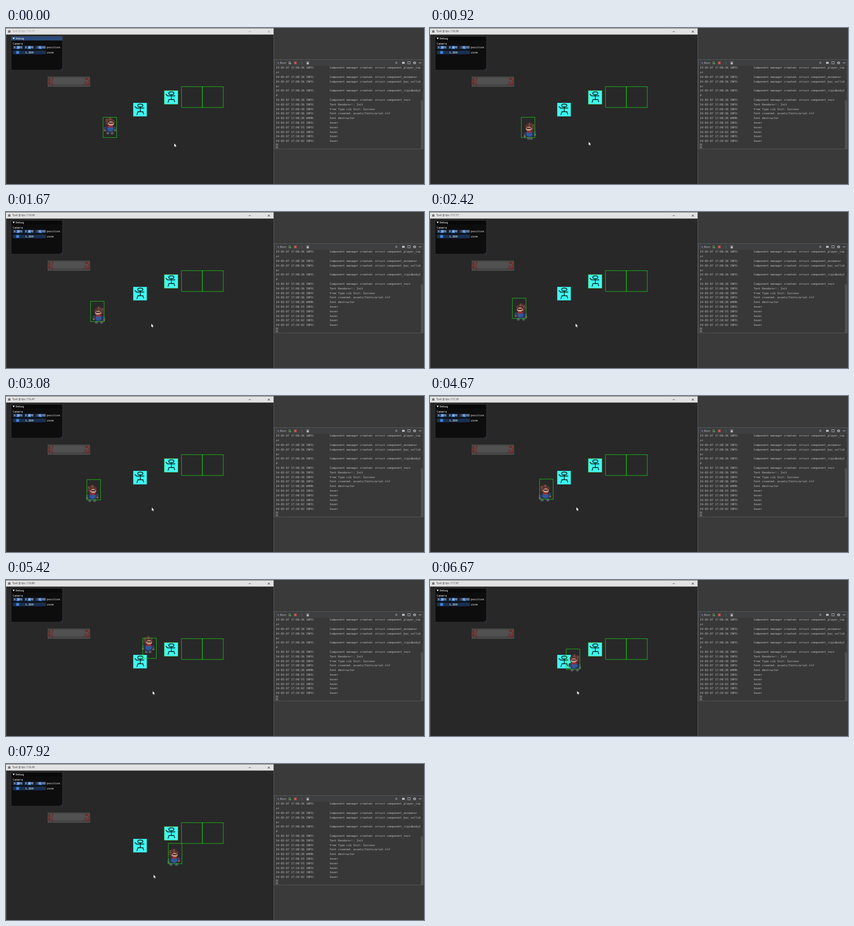
These frames come from a looping animation (800x300 px, 8 s). An HTML page with a canvas:

```html
<!DOCTYPE html>
<html lang="en">
<head>
<meta charset="utf-8">
<title>Game debug session</title>
<style>
  html, body { margin: 0; width: 100%; height: 100%; overflow: hidden; background: #3a3a3a; }
  canvas { display: block; width: 800px; height: 300px; }
</style>
</head>
<body>
<canvas id="stage" width="800" height="300"></canvas>
<script>
const ctx = document.getElementById('stage').getContext('2d');
const LOOP = 8000, STEPS = 96, STEP = LOOP / STEPS, FOCUS_TIME = 330;
const MONO = '"DejaVu Sans Mono", monospace', SANS = '"Open Sans", sans-serif';
const GREEN = '#1cc01c', INK = '#071b1b', ICON = '#b5b7b9';

// Waypoints: time, x, y
const playerRoute = [
  [0, 186, 172], [FOCUS_TIME, 186, 172], [1667, 162, 172], [3083, 155, 161],
  [4000, 172, 162], [4850, 220, 160], [5200, 250, 97], [5500, 267, 118],
  [5950, 300, 134], [6667, 261, 133], [7150, 300, 136], [7550, 303, 166], [LOOP, 313, 150]
];
const pointerRoute = [[0, 322, 222], [500, 322, 222], [1500, 278, 215], [LOOP, 282.5, 213]];

const log = (time, level, message) => `24-03-07 ${time} ${level}:`.padEnd(32) + message;
const info = message => log('17:08:36', 'INFO', message);
const component = name => info('Component manager created: struct component_' + name);
const consoleLines = [
  component('player_inp'), 'ut', component('animator'), component('box_collid'), 'er',
  component('rigidbody2'), 'd', component('text'),
  info('Text Renderer:: Init'), info('Free Type Lib Init: Success'),
  info('Font created: assets/fonts/arial.ttf'), log('17:08:36', 'WARN', 'Font destructor'),
  ...['08:55', '08:55', '10:02', '10:02', '10:02'].map(t => log('17:' + t, 'INFO', 'hover'))
];

const noise = n => { const v = Math.sin(n * 127.1 + 3.7) * 43758.5453; return v - Math.floor(v); };

function follow(route, t) {
  const next = route.findIndex(([time]) => time > t);
  const [t0, x0, y0] = route[next - 1], [t1, x1, y1] = route[next];
  const vx = (x1 - x0) / (t1 - t0), vy = (y1 - y0) / (t1 - t0);
  return { x: x0 + vx * (t - t0), y: y0 + vy * (t - t0), vx, vy };
}

function fill(color, x, y, w, h) {
  ctx.fillStyle = color;
  ctx.fillRect(x, y, w, h);
}

function outline(color, x, y, w, h, width = 1) {
  ctx.strokeStyle = color;
  ctx.lineWidth = width;
  ctx.strokeRect(x, y, w, h);
}

function line(color, width, ...points) {
  ctx.beginPath();
  points.forEach(([x, y]) => ctx.lineTo(x, y));
  ctx.strokeStyle = color;
  ctx.lineWidth = width;
  ctx.stroke();
}

function polygon(color, ...points) {
  ctx.beginPath();
  points.forEach(([x, y]) => ctx.lineTo(x, y));
  ctx.fillStyle = color;
  ctx.fill();
}

function oval(x, y, rx, ry) {
  ctx.beginPath();
  ctx.ellipse(x, y, rx, ry, 0, 0, Math.PI * 2);
}

function blob(color, x, y, rx, ry) {
  oval(x, y, rx, ry);
  ctx.fillStyle = color;
  ctx.fill();
}

function ring(color, width, x, y, rx, ry) {
  oval(x, y, rx, ry);
  ctx.strokeStyle = color;
  ctx.lineWidth = width;
  ctx.stroke();
}

function cross(color, x, y) {
  line(color, .8, [x - 2, y - 2], [x + 2, y + 2]);
  line(color, .8, [x + 2, y - 2], [x - 2, y + 2]);
}

function label(text, x, y, color, size = 5.35, family = MONO, align = 'left') {
  ctx.font = `${size}px ${family}`;
  ctx.textAlign = align;
  ctx.textBaseline = 'middle';
  ctx.fillStyle = color;
  ctx.fillText(text, x, y);
}

function drawWindow(step, focused) {
  fill('#282828', 0, 0, 513, 300);
  fill('#e2e2e2', 0, .6, 513, 12);
  line('#555', 1, [512.5, 0], [512.5, 300]);
  line('#555', 1, [.5, 13], [.5, 300]);
  fill('#777', 4, 4.5, 4.5, 4.5);
  const ink = focused ? '#333' : '#999';
  const rate = 116.3 + noise(step) * 2.8;
  label(`Tovil @ fps: ${rate.toFixed(2)}`, 12, 7, ink, 5, SANS);
  line(ink, .8, [464.5, 7], [468.5, 7]);
  cross(ink, 503, 7);
}

function slider(x, y, w, value, grab) {
  fill('#1b3050', x, y, w, 7);
  fill('#3b82dc', x + grab, y + .7, 5.5, 5.6);
  label(value, x + w / 2, y + 3.7, '#eee', 5.35, MONO, 'center');
}

function drawDebugPanel(focused) {
  fill('#0d0d0d', 10, 16, 98, 65);
  fill(focused ? '#090909' : '#294a7a', 10, 16, 98, 8);
  outline('#3c3c43', 10, 16, 98, 65, .6);
  polygon('#eee', [12.5, 18.5], [17, 18.5], [14.75, 22]);
  label('Debug', 18.5, 20.3, '#f2f2f2');
  label('Camera', 13, 30.3, '#eee');
  ['0.500', '0.000', '-10.00'].forEach((value, i) => slider(13 + i * 21.5, 34, 20, value, 7.3));
  slider(13, 43.5, 63.5, '1.000', 6.5);
  label('position', 78, 37.8, '#eee');
  label('zoom', 78, 47.2, '#eee');
  polygon('#1d2c40', [108, 76], [108, 81], [103, 81]);
}

function drawBanner() {
  fill('#3c3c3c', 80, 94, 81, 19);
  fill('#525252', 82, 95.5, 77, 15);
  fill('#494949', 84, 107, 73, 3.5);
  outline('#6a6a6a', 80.5, 94, 79.5, 18.5, .6);
  for (let i = 0; i < 60; i++) {
    const depth = noise(i) ** 2 * 10, y = 95 + noise(i + 80) * 15;
    fill(i % 3 ? '#6c2424' : '#8c2a2a', i % 2 ? 81 + depth : 158 - depth, y, 1.8, 1.8);
  }
}

function drawStickBlock(x, y) {
  ctx.save();
  ctx.translate(x, y);
  fill('#3ffaf0', 0, 0, 26, 26);
  ring(INK, 1.5, 13.5, 5, 5, 2.8);
  line(INK, 1.4, [13.5, 8], [13.5, 17]);
  line(INK, 1.4, [3, 6.5], [6, 10], [21, 10]);
  line(INK, 1.4, [7, 23], [9, 17], [18.5, 17], [20, 22]);
  ctx.restore();
}

function drawHero(swing) {
  for (const side of [-1, 1]) {
    blob('#55565e', 13 + side * (4 + swing), 30, 3, 3);
    blob('#3a4356', 13 + side * 9, 22 - side * swing, 3, 4.5);
    blob('#8a6156', 13 + side * 10, 25 - side * swing, 2, 1.8);
  }
  blob('#263656', 13, 22, 8.5, 7);
  blob('#30589a', 14, 22, 6, 5);
  blob('#4a2d2c', 12.5, 9, 10, 9);
  for (let i = 0; i < 16; i++) {
    const angle = i * 2.4, r = Math.sqrt(noise(i)) * 7.5;
    fill(i % 2 ? '#70463e' : '#8a5949', 11.5 + Math.cos(angle) * r, 7 + Math.sin(angle) * r, 2.5, 2);
  }
  blob('#c59380', 15, 12, 5.5, 4);
  fill('#35262b', 11, 10, 8, 2);
  blob('#952d38', 14, 17.5, 5.5, 2);
}

function drawPlayer(t, step) {
  const { x, y, vx, vy } = follow(playerRoute, t);
  const moving = vx !== 0;
  const lagX = -3 * Math.sign(vx), lagY = moving ? 10 - Math.max(0, vy) * 200 : 0;
  ctx.save();
  ctx.translate(Math.round(x + 13 + lagX), Math.round(y + lagY));
  if (vx < 0) ctx.scale(-1, 1);
  ctx.translate(-13, 0);
  drawHero(moving ? Math.sin(step * 1.6) * 1.5 : 0);
  ctx.restore();
  outline(GREEN, Math.round(x) - .2, Math.round(y) - .2, 26, 39, .9);
}

function drawScene() {
  drawBanner();
  drawStickBlock(243.5, 144);
  drawStickBlock(303, 120.5);
  outline('#62d83c', 303, 120.5, 26, 26, .6);
  for (const x of [336, 376]) outline(GREEN, x - .2, 112.8, 40, 40, .9);
}

function drawConsoleHeader(focused) {
  fill('#3d3f41', 514, 61, 284, 12);
  line('#b0708c', .9, [518, 65], [522.5, 69]);
  line('#5b91bd', .9, [520.5, 69], [522.5, 66]);
  label('Run:', 524.5, 67, '#c5c5c5', 5.8, SANS);
  const rerun = focused ? '#5ca65c' : '#aaa';
  line(rerun, .9, [545, 65], [541.5, 65], [541.5, 69], [544, 69]);
  polygon(rerun, [543, 66.5], [546.5, 68.2], [543, 70]);
  fill('#cc5350', 551.5, 64.7, 4.6, 4.8);
  line('#555', .6, [561, 63], [561, 71]);
  line('#666', .8, [566.5, 64.5], [566.5, 69.5]);
  fill(ICON, 575.5, 66, 4, 4);
  fill(ICON, 575, 64.5, 5, .8);
  cross(ICON, 747, 67);
  fill(ICON, 758, 65, 5, 4);
  outline(ICON, 769, 64.5, 4.5, 4.5, .8);
  ring(ICON, 1.4, 782, 67, 1.8, 1.8);
  line(ICON, .9, [790, 67], [795, 67]);
}

function drawConsole(focused) {
  fill('#3a3a3a', 513, 0, 287, 300);
  fill('#383838', 514, 61, 284, 171);
  drawConsoleHeader(focused);
  consoleLines.forEach((text, i) => label(text, 516.5, 77.1 + i * 8.8, '#bebebe'));
  fill('#505050', 794, 139, 4, 93);
  outline('#bbb', 517, 223, 3, 7.5, .7);
  outline('#5d5d5d', 513.5, 60.5, 285, 172, .8);
}

function drawPointer(t) {
  const { x, y } = follow(pointerRoute, t);
  ctx.save();
  ctx.translate(x, y);
  polygon('#f4f4f4', [0, 0], [0, 6.2], [1.5, 5], [2.5, 7.2], [3.5, 6.6], [2.5, 4.6], [4.4, 4.4]);
  ctx.restore();
}

function frame(now) {
  const step = Math.floor((now % LOOP + 4) / STEP) % STEPS;
  const t = step * STEP, focused = t >= FOCUS_TIME;
  drawConsole(focused);
  drawWindow(step, focused);
  drawScene();
  drawPlayer(t, step);
  drawDebugPanel(focused);
  drawPointer(t);
  requestAnimationFrame(frame);
}
requestAnimationFrame(frame);
</script>
</body>
</html>
```
